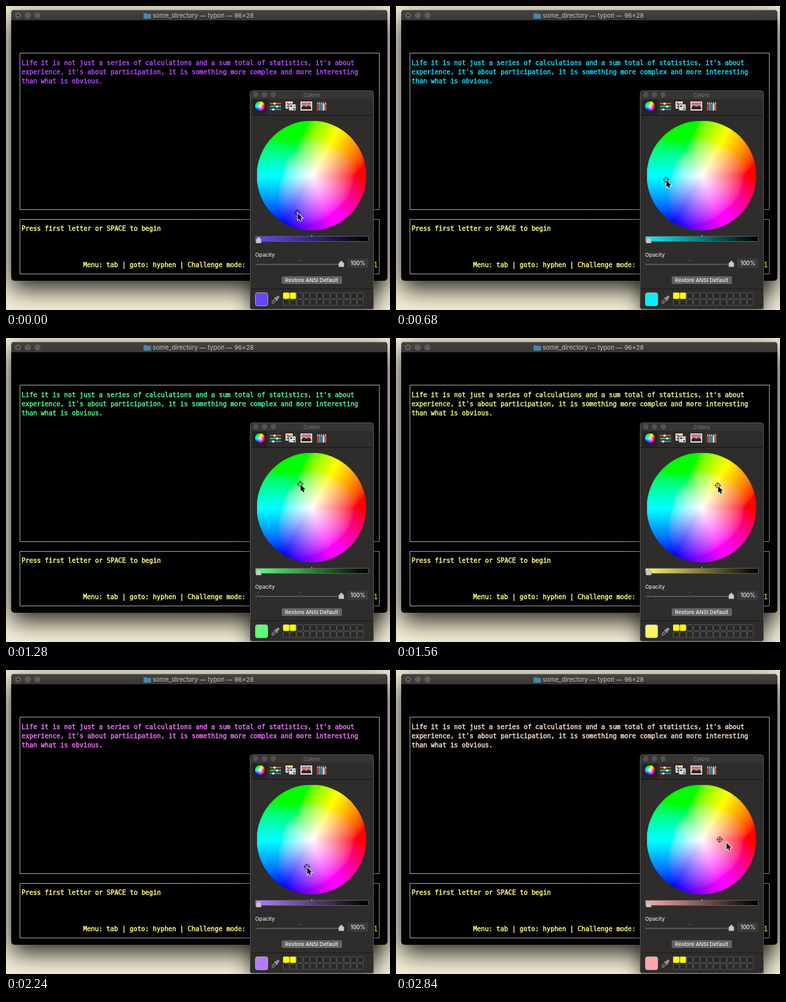
An HTML page with a canvas that plays this animation: 592 by 468 pixels, repeating every 2.88 s.

```html
<!DOCTYPE html>
<html lang="en">
<head>
<meta charset="utf-8">
<title>Terminal colour picker</title>
<style>
  html, body { margin: 0; width: 100%; height: 100%; overflow: hidden; background: #f5eed6; }
  canvas { display: block; }
</style>
</head>
<body>
<canvas id="stage" width="592" height="468"></canvas>
<script>
const ctx = document.getElementById('stage').getContext('2d');
const LOOP = 2880, STEP = 40, TEXT_LAG = 80;
const MONO = '9.91px "DejaVu Sans Mono", monospace';
const ui = (size, weight = 400) => `${weight} ${size}px Inter, sans-serif`;
const WHEEL = { x: 471, y: 261, r: 84.5 };

// Picker path: time, x, y
const PATH = [
  [-120, 486, 319], [0, 449, 318], [400, 427, 288], [700, 416, 266],
  [1000, 426, 248], [1300, 456, 224], [1560, 496, 227], [1700, 513, 242],
  [1840, 520, 265], [1920, 518, 266], [2120, 492, 302], [2330, 447, 296],
  [2520, 453, 262], [2680, 473, 250], [2840, 499, 261], [2960, 512, 268]
];

function slope(i, axis) {
  const a = PATH[Math.max(0, i - 1)], b = PATH[Math.min(PATH.length - 1, i + 1)];
  return (b[axis] - a[axis]) / (b[0] - a[0]);
}

function pickAt(time) {
  let i = 0;
  while (i < PATH.length - 2 && time >= PATH[i + 1][0]) i++;
  const a = PATH[i], b = PATH[i + 1], span = b[0] - a[0], u = (time - a[0]) / span;
  const blend = axis => {
    const u2 = u * u, u3 = u2 * u;
    return (2 * u3 - 3 * u2 + 1) * a[axis] + (3 * u2 - 2 * u3) * b[axis]
      + span * ((u3 - 2 * u2 + u) * slope(i, axis) + (u3 - u2) * slope(i + 1, axis));
  };
  return { x: blend(1), y: blend(2) };
}

const toLinear = v => v <= 0.04045 ? v / 12.92 : ((v + 0.055) / 1.055) ** 2.4;
const toByte = v => {
  const c = Math.min(1, Math.max(0, v));
  return Math.round(255 * (c <= 0.0031308 ? 12.92 * c : 1.055 * c ** (1 / 2.4) - 0.055));
};

// Full-value HSV in Display P3, clipped to sRGB; dx and dy are in wheel radii.
function wheelRGB(dx, dy) {
  const hue = Math.atan2(-dy, dx) * 3 / Math.PI + 6, sat = Math.min(1, Math.hypot(dx, dy));
  const [r, g, b] = [5, 3, 1].map(n => {
    const k = (n + hue) % 6;
    return toLinear(1 - sat * Math.max(0, Math.min(k, 4 - k, 1)));
  });
  return [
    1.2249 * r - 0.2247 * g,
    -0.042 * r + 1.0419 * g,
    -0.0196 * r - 0.0786 * g + 1.0979 * b
  ].map(toByte);
}

function wheelColor({ x, y }) {
  return `rgb(${wheelRGB((x - WHEEL.x) / WHEEL.r, (y - WHEEL.y) / WHEEL.r)})`;
}

function makeWheel(size) {
  const canvas = new OffscreenCanvas(size, size), wheel = canvas.getContext('2d');
  const image = wheel.createImageData(size, size), half = size / 2;
  for (let y = 0; y < size; y++) {
    for (let x = 0; x < size; x++) {
      const rgb = wheelRGB((x + 0.5 - half) / half, (y + 0.5 - half) / half);
      image.data.set([...rgb, 255], 4 * (y * size + x));
    }
  }
  wheel.putImageData(image, 0, 0);
  return canvas;
}
const wheelImage = makeWheel(169);

function drawWheel(x, y, r) {
  ctx.save();
  ctx.beginPath();
  ctx.arc(x, y, r, 0, 7);
  ctx.clip();
  ctx.drawImage(wheelImage, x - r, y - r, 2 * r, 2 * r);
  ctx.restore();
}

function box(x, y, w, h, fill, radius = 0, stroke) {
  ctx.beginPath();
  ctx.roundRect(x, y, w, h, radius);
  if (fill) { ctx.fillStyle = fill; ctx.fill(); }
  if (stroke) { ctx.strokeStyle = stroke; ctx.lineWidth = 1; ctx.stroke(); }
}

function dot(x, y, r, fill) {
  ctx.beginPath();
  ctx.arc(x, y, r, 0, 7);
  ctx.fillStyle = fill;
  ctx.fill();
}

function shape(points, fill, stroke, width = 1) {
  ctx.beginPath();
  points.forEach(([x, y]) => ctx.lineTo(x, y));
  ctx.closePath();
  if (stroke) { ctx.strokeStyle = stroke; ctx.lineWidth = width; ctx.stroke(); }
  ctx.fillStyle = fill;
  ctx.fill();
}

function label(text, x, y, font, fill, align = 'left') {
  ctx.font = font;
  ctx.textAlign = align;
  ctx.fillStyle = fill;
  ctx.fillText(text, x, y);
}

function mono(text, x, y, fill) {
  label(text, x, y, MONO, fill);
  ctx.strokeStyle = fill;
  ctx.lineWidth = 0.45;
  ctx.strokeText(text, x, y);
}

function shadowed(blur, offset, color, draw) {
  ctx.save();
  ctx.shadowBlur = blur;
  ctx.shadowOffsetY = offset;
  ctx.shadowColor = color;
  draw();
  ctx.restore();
}

function drawTerminal(textColor) {
  shadowed(36, 13, 'rgba(0,0,0,.85)', () => box(8, 6, 580, 417, '#000', 5));
  const bar = ctx.createLinearGradient(0, 6, 0, 22);
  bar.addColorStop(0, '#444341');
  bar.addColorStop(1, '#383736');
  box(8, 6, 580, 16, bar, [5, 5, 0, 0]);
  box(12, 6, 572, 1, '#6b6a68');
  for (const x of [18.5, 33.5, 48.5]) dot(x, 14.5, 4.8, '#5d5c5b');
  dot(18.5, 14.5, 1.6, '#222');
  box(212, 11, 5, 3, '#3f86a8', 1);
  box(212, 12, 11.5, 7.5, '#4488aa', 1);
  label('some_directory — typon — 96×28', 304, 18, ui(9.6), '#c6c5c3', 'center');

  box(21.5, 72.5, 554, 241, null, 0, '#a4a4a4');
  box(21.5, 328.5, 554, 84, null, 0, '#a4a4a4');
  [
    "Life it is not just a series of calculations and a sum total of statistics, it's about",
    "experience, it's about participation, it is something more complex and more interesting",
    'than what is obvious.'
  ].forEach((line, i) => mono(line, 24, 91 + 14 * i, textColor));
  mono('Press first letter or SPACE to begin', 24, 346, '#ffff6e');
  mono('Menu: tab | goto: hyphen | Challenge mode:', 119, 402, '#ffff6e');
  mono('1', 567, 402, '#ffff6e');
}

function drawToolbar() {
  box(380, 144, 23, 24, '#242322');
  drawWheel(391.5, 154, 7.5);
  ['#ff4038', '#35d845', '#3f70ff'].forEach((color, i) => {
    const y = 149 + 4.5 * i;
    box(407, y, 17, 2.2, color);
    dot([414, 418, 412][i], y + 1.2, 1.8, '#fff');
  });

  box(431, 147, 11, 11, '#f4f4f4');
  ['#ff4d40', '#ffcc20', '#4c80ff', '#59c948'].forEach((color, i) =>
    box(432.5 + i % 2 * 4.5, 148.5 + (i >> 1) * 4.5, 3.5, 3.5, color));
  box(436, 151, 11, 10, '#f4f4f4', 0, '#333');
  ['#333', '#999', '#ccc', '#555'].forEach((color, i) =>
    box(438 + i % 2 * 4.5, 153 + (i >> 1) * 4, 3, 2.5, color));

  box(454, 147, 18, 14, '#f6e3ea');
  const sky = ctx.createLinearGradient(0, 148, 0, 156);
  sky.addColorStop(0, '#9b5a9b');
  sky.addColorStop(1, '#ffb35c');
  box(455.5, 148.5, 15, 11, sky);
  shape([[455.5, 156], [459, 153], [463, 155], [467, 153], [470.5, 156], [470.5, 159], [455.5, 159]], '#2c2530');

  ['#e7352c', '#37b0a8', '#2d8ec9', '#f1f1f1', '#e34f3e'].forEach((color, i) => {
    const x = 479.5 + 3 * i;
    box(x, 151, 2.3, 10, color);
    shape([[x, 151], [x + 1.15, 147], [x + 2.3, 151]], '#e8d0aa');
  });
}

function thumb(x, y) {
  shape([[x - 4, y + 4.5], [x - 4, y - 1], [x, y - 5], [x + 4, y - 1], [x + 4, y + 4.5]],
    '#c9c8c7', '#555', 0.7);
}

function drawPanel(color) {
  shadowed(30, 10, 'rgba(0,0,0,.65)', () => box(376, 130, 191, 337, '#2e2d2b', 4));
  box(376.5, 130.5, 190, 336, null, 4, '#555452');
  box(377, 131, 189, 12, '#373634', [4, 4, 0, 0]);
  for (const x of [385, 398.5, 412]) dot(x, 136.5, 4.2, '#535250');
  label('Colors', 471, 139.5, ui(8.2), '#81807e', 'center');
  drawToolbar();
  box(377, 168, 189, 1, '#191817');

  drawWheel(WHEEL.x, WHEEL.y, WHEEL.r);

  const fade = ctx.createLinearGradient(388, 0, 556, 0);
  fade.addColorStop(0, color);
  fade.addColorStop(1, '#000');
  box(384.5, 354.5, 174, 8, fade, 1, '#5d5c5a');
  box(471, 352, 1, 3, '#aaa');
  thumb(389.5, 360.5);

  label('Opacity', 384, 386, ui(8.2, 500), '#e3e2e0');
  box(384, 397, 137, 1.5, '#62615f', 1);
  for (const x of [388, 452]) box(x, 391, 1, 2, '#777674');
  thumb(517, 397);
  box(526, 389, 32, 14, '#3c3b39', 1);
  label('100%', 542.5, 399, ui(8.4, 500), '#f0efed', 'center');
  box(425, 416, 93, 12, '#646361', 2.5);
  label('Restore ANSI Default', 471, 425, ui(8.2, 500), '#f4f3f1', 'center');

  box(377, 435, 189, 1, '#1c1b1a');
  box(384.5, 441.5, 19, 20, color, 3, '#a9a8a6');
  drawDropper();
  for (let i = 0; i < 24; i++) {
    const x = 427.5 + 10.4 * (i % 12), y = 441.5 + 10.5 * Math.floor(i / 12);
    box(x, y, 9, 9, i < 2 ? '#ffff00' : '#292826', 1, i < 2 ? '#d5d345' : '#555452');
  }
}

function drawDropper() {
  ctx.save();
  ctx.translate(415.5, 452);
  ctx.rotate(Math.PI / 4);
  box(-1.5, -1, 3, 8, '#393836', 1, '#969593');
  box(-3.5, -2.5, 7, 2, '#969593', 1);
  box(-2, -7.5, 4, 6, '#969593', 1.5);
  ctx.restore();
}

function drawMarker({ x, y }) {
  ctx.beginPath();
  ctx.arc(x, y, 3.6, 0, 7);
  ctx.moveTo(x - 5, y);
  ctx.lineTo(x + 5, y);
  ctx.moveTo(x, y - 5);
  ctx.lineTo(x, y + 5);
  ctx.strokeStyle = 'rgba(0,0,0,.8)';
  ctx.lineWidth = 0.8;
  ctx.stroke();
}

function drawPointer(x, y) {
  const outline = [[0, 0], [0, 10.5], [2.4, 8.3], [4, 12], [5.8, 11.2], [4.2, 7.6], [7.4, 7.4]];
  shape(outline.map(([dx, dy]) => [x + dx, y + dy]), '#000', '#fff', 1.6);
}

function render(time) {
  ctx.fillStyle = '#f5eed6';
  ctx.fillRect(0, 0, 592, 468);
  const pick = pickAt(time);
  drawTerminal(wheelColor(pickAt(time - TEXT_LAG)));
  drawPanel(wheelColor(pick));
  drawMarker(pick);
  // The pointer pulls ahead of the marker on the last sweep.
  const lead = Math.max(0, (time - 2600) / 240);
  drawPointer(pick.x + 0.7 + 10 * lead, pick.y + 1 + 4 * lead);
}

let shown = -1;
function tick() {
  const time = Math.floor(performance.now() % LOOP / STEP) * STEP;
  if (time !== shown) render(shown = time);
  requestAnimationFrame(tick);
}
tick();
</script>
</body>
</html>
```
